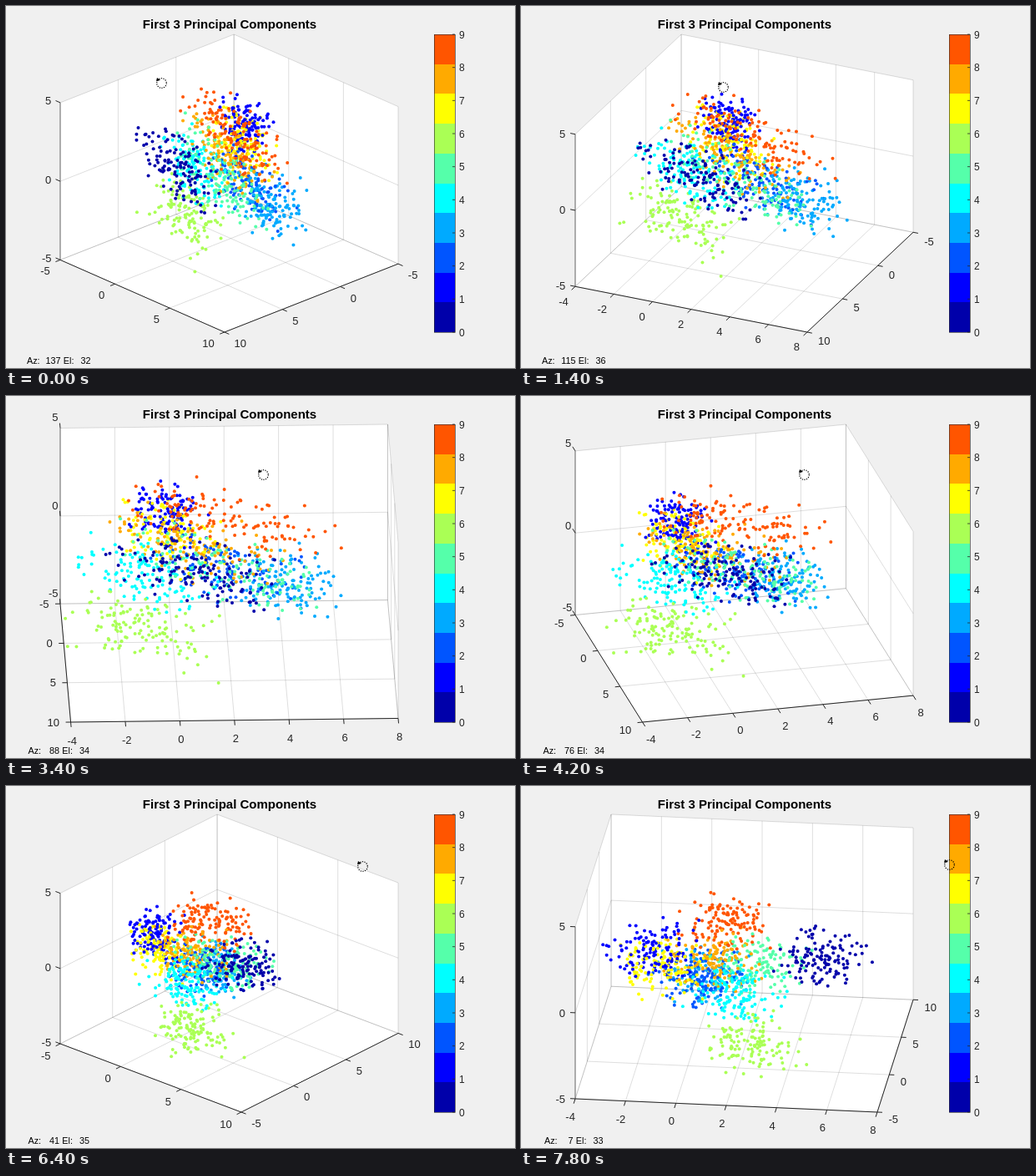
Write an HTML page with a canvas that moves like this. It is 610 by 434 pixels and loops after 8 s.

```html
<!DOCTYPE html>
<html lang="en">
<head>
<meta charset="utf-8">
<title>First 3 Principal Components</title>
<style>
  html, body { margin: 0; width: 100%; height: 100%; overflow: hidden; background: #f0f0f0; }
  canvas { display: block; width: 610px; height: 434px; }
</style>
</head>
<body>
<canvas id="plot" width="610" height="434"></canvas>
<script>
const ctx = document.getElementById('plot').getContext('2d');
const FONT = '"Liberation Sans", Arial, sans-serif';
const BOX = { left: 65, right: 470, top: 34, bottom: 391 };
const LOOP = 8000, STEP = 200, CLASSES = 10;
const INK = '#262626', GRID = 'rgba(38, 38, 38, 0.15)';

// Jet colour ramp, one colour per class
const channel = v => Math.round(255 * Math.max(0, Math.min(1, v / 3)));
const classColor = i =>
  `rgb(${channel(i - 4)}, ${channel(Math.min(i - 1, 10 - i))}, ${channel(Math.min(i + 2, 7 - i))})`;

// Pointer drag: time, x, y. The view angles follow from it.
const DRAG = [
  [0, 186, 92], [1400, 241.5, 97], [2400, 279.5, 97], [3400, 308, 94.4],
  [5000, 369, 94.3], [6400, 427, 95.5], [7800, 513, 93.5]
];

// Centre of each class and its spread along y
const CENTERS = [
  [5.2, 0.6, 1.4, 1.5], [-1.4, -0.1, 1.8, 0.7], [0.3, 2.2, -0.8, 1.4], [0.3, 4, -1.5, 1.1],
  [2, -1, -0.2, 1.2], [2.6, 2, 0.2, 1.9], [2.7, -1.1, -3, 1.3], [-1, 0.1, 0.5, 0.9],
  [1, 0.8, 0.9, 1.6], [1.3, 2.2, 2.5, 1.8]
];
const PER_CLASS = 125, SPREAD_X = 0.9, SPREAD_Z = 0.85, TILT = -0.35;

let seed = 20240;
function random() {
  seed = (seed + 0x6d2b79f5) | 0;
  let v = Math.imul(seed ^ (seed >>> 15), 1 | seed);
  v = (v + Math.imul(v ^ (v >>> 7), 61 | v)) ^ v;
  return ((v ^ (v >>> 14)) >>> 0) / 4294967296;
}
function gauss() {
  const g = Math.sqrt(-2 * Math.log(1 - random())) * Math.cos(2 * Math.PI * random());
  return Math.abs(g) < 2.25 ? g : gauss();
}
const points = CENTERS.flatMap(([x, y, z, spreadY], i) =>
  Array.from({ length: PER_CLASS }, () => {
    const dy = spreadY * gauss();
    return {
      x: x + SPREAD_X * gauss(),
      y: y + dy,
      z: z + SPREAD_Z * gauss() + TILT * dy,
      color: classColor(i)
    };
  }));

function pointerAt(time) {
  let i = 0;
  while (i < DRAG.length - 2 && time >= DRAG[i + 1][0]) i++;
  const [t0, x0, y0] = DRAG[i], [t1, x1, y1] = DRAG[i + 1];
  const k = (time - t0) / (t1 - t0);
  return [x0 + (x1 - x0) * k, y0 + (y1 - y0) * k];
}

// Orthographic view of a unit cube, stretched to fill BOX.
function makeView(az, el) {
  const rad = Math.PI / 180;
  const ca = Math.cos(az * rad), sa = Math.sin(az * rad);
  const ce = Math.cos(el * rad), se = Math.sin(el * rad);
  const minX = Math.min(0, ca), minY = -se * sa + Math.min(0, se * ca);
  const span = Math.abs(ca) + Math.abs(sa);
  const kx = (BOX.right - BOX.left) / span;
  const ky = (BOX.bottom - BOX.top) / (se * span + ce);
  return {
    project: ([x, y, z]) => [
      BOX.left + kx * (ca * x + sa * y - minX),
      BOX.bottom - ky * (se * (ca * y - sa * x) + ce * z - minY)
    ],
    depth: ([x, y, z]) => ce * (sa * x - ca * y) + se * z
  };
}

function makeAxis(min, max, step) {
  const ticks = [];
  for (let v = min; v <= max; v += step) ticks.push(v);
  return { ticks, unit: v => (v - min) / (max - min) };
}
// Long edges get finer ticks and tighter limits.
const horizontalAxis = length => length > 252 ? makeAxis(-4, 8, 2) : makeAxis(-5, 10, 5);
const Z_AXIS = makeAxis(-5, 5, 5);

function polyline(pts, color, width = 1) {
  ctx.beginPath();
  pts.forEach(p => ctx.lineTo(...p));
  ctx.strokeStyle = color;
  ctx.lineWidth = width;
  ctx.stroke();
}
function polygon(pts, color) {
  ctx.beginPath();
  pts.forEach(p => ctx.lineTo(...p));
  ctx.fillStyle = color;
  ctx.fill();
}
function text(str, x, y, size, align = 'center', color = INK, weight = '') {
  ctx.font = `${weight} ${size}px ${FONT}`;
  ctx.textAlign = align;
  ctx.fillStyle = color;
  ctx.fillText(str, x, y);
}

function direction(a, b) {
  const dx = b[0] - a[0], dy = b[1] - a[1], length = Math.hypot(dx, dy);
  return { dx: dx / length, dy: dy / length, length };
}
const reverse = ({ dx, dy }) => ({ dx: -dx, dy: -dy });

function drawTick([x, y], { dx, dy }, value, upright) {
  polyline([[x, y], [x + 6 * dx, y + 6 * dy]], INK);
  ctx.font = `13px ${FONT}`;
  const half = ctx.measureText(value).width / 2;
  let ox = dx * (13.5 + half), oy = 8 + 14 * dy;
  if (upright) {
    ox = Math.min(dx * (12 + half), -2.5 - half);
    oy = -13 * dy * dy;
  } else if (Math.abs(dy) < 0.03) oy = 0;
  text(value, x + ox, y + oy + 4.7, 13);
}

function drawAxes(view, az) {
  const P = view.project;
  const far = az > 90;
  // floor corners
  const left = far ? [1, 0] : [0, 0], front = far ? [1, 1] : [1, 0];
  const right = far ? [0, 1] : [1, 1], back = far ? [0, 0] : [0, 1];
  const low = c => P([...c, 0]), high = c => P([...c, 1]);
  const toFront = direction(low(left), low(front));
  const toRight = direction(low(front), low(right));
  const xAxis = horizontalAxis((far ? toRight : toFront).length);
  const yAxis = horizontalAxis((far ? toFront : toRight).length);
  const yBack = back[1], yFront = 1 - yBack;

  polygon([low(left), low(front), low(right), high(right), high(back), high(left)], '#fff');

  const grid = (...pts) => polyline(pts.map(P), GRID);
  for (const u of xAxis.ticks.map(xAxis.unit)) grid([u, yFront, 0], [u, yBack, 0], [u, yBack, 1]);
  for (const u of yAxis.ticks.map(yAxis.unit)) grid([1, u, 0], [0, u, 0], [0, u, 1]);
  for (const u of Z_AXIS.ticks.map(Z_AXIS.unit)) grid([...left, u], [...back, u], [...right, u]);

  polyline([low(left), low(front), low(right)], INK);
  polyline([low(left), high(left)], '#555', 0.8);

  const outLeft = reverse(toRight), outRight = toFront;
  for (const v of xAxis.ticks)
    drawTick(P([xAxis.unit(v), yFront, 0]), far ? outRight : outLeft, v);
  for (const v of yAxis.ticks)
    drawTick(P([1, yAxis.unit(v), 0]), far ? outLeft : outRight, v);
  for (const v of Z_AXIS.ticks)
    drawTick(P([...left, Z_AXIS.unit(v)]), reverse(toFront), v, true);
  return { xAxis, yAxis };
}

function drawPoints(view, { xAxis, yAxis }) {
  points
    .map(p => {
      const unit = [xAxis.unit(p.x), yAxis.unit(p.y), Z_AXIS.unit(p.z)];
      return { at: view.project(unit), depth: view.depth(unit), color: p.color };
    })
    .sort((a, b) => a.depth - b.depth)
    .forEach(({ at, color }) => {
      ctx.beginPath();
      ctx.arc(...at, 2, 0, 2 * Math.PI);
      ctx.fillStyle = color;
      ctx.fill();
    });
}

function drawColorbar() {
  const height = BOX.bottom - BOX.top;
  const level = k => BOX.bottom - height * k;
  for (let i = 0; i < CLASSES; i++) {
    const top = Math.round(level((i + 1) / CLASSES)), bottom = Math.round(level(i / CLASSES));
    ctx.fillStyle = classColor(i);
    ctx.fillRect(513, top, 25, bottom - top);
  }
  for (let i = 0; i < CLASSES; i++) {
    const y = level(i / (CLASSES - 1));
    polyline([[535, y], [538, y]], INK, 0.8);
    text(i, 543, y + 4.5, 12, 'left');
  }
  ctx.lineWidth = 0.6;
  ctx.strokeRect(513.5, 34.5, 25, height);
}

function drawReadout(az, el) {
  const inset = 1.5 * (3 - String(az).length);
  const put = (str, x, align) => text(str, x, 429, 10.8, align, '#000');
  put('Az:', 25 + inset, 'left');
  put(az, 65.5 - inset, 'right');
  put('El:', 68.8 - inset, 'left');
  put(el, 101.5 - inset, 'right');
}

function drawPointer(x, y) {
  ctx.strokeStyle = '#000';
  ctx.lineWidth = 1.2;
  ctx.setLineDash([1.2, 1.4]);
  ctx.beginPath();
  ctx.arc(x + 0.5, y + 0.5, 5.8, 0, 2 * Math.PI);
  ctx.stroke();
  ctx.setLineDash([]);
  polygon([[x - 6, y - 2], [x - 5, y - 6], [x - 1, y - 3]], '#000');
}

function draw(time) {
  const [x, y] = pointerAt(time);
  const az = 136.6 - 0.397 * (x - 186), el = 32.3 + 0.7 * (y - 92);
  const view = makeView(az, el);
  ctx.fillStyle = '#f0f0f0';
  ctx.fillRect(0, 0, 610, 434);
  drawPoints(view, drawAxes(view, az));
  text('First 3 Principal Components', 268, 27, 15, 'center', '#000', 'bold');
  drawColorbar();
  drawReadout(Math.round(az), Math.round(el));
  drawPointer(Math.round(x), Math.round(y));
}

const start = performance.now();
let shown = -1;
function tick() {
  const time = Math.floor(((performance.now() - start) % LOOP) / STEP) * STEP;
  if (time !== shown) draw(shown = time);
  requestAnimationFrame(tick);
}
tick();
</script>
</body>
</html>
```
